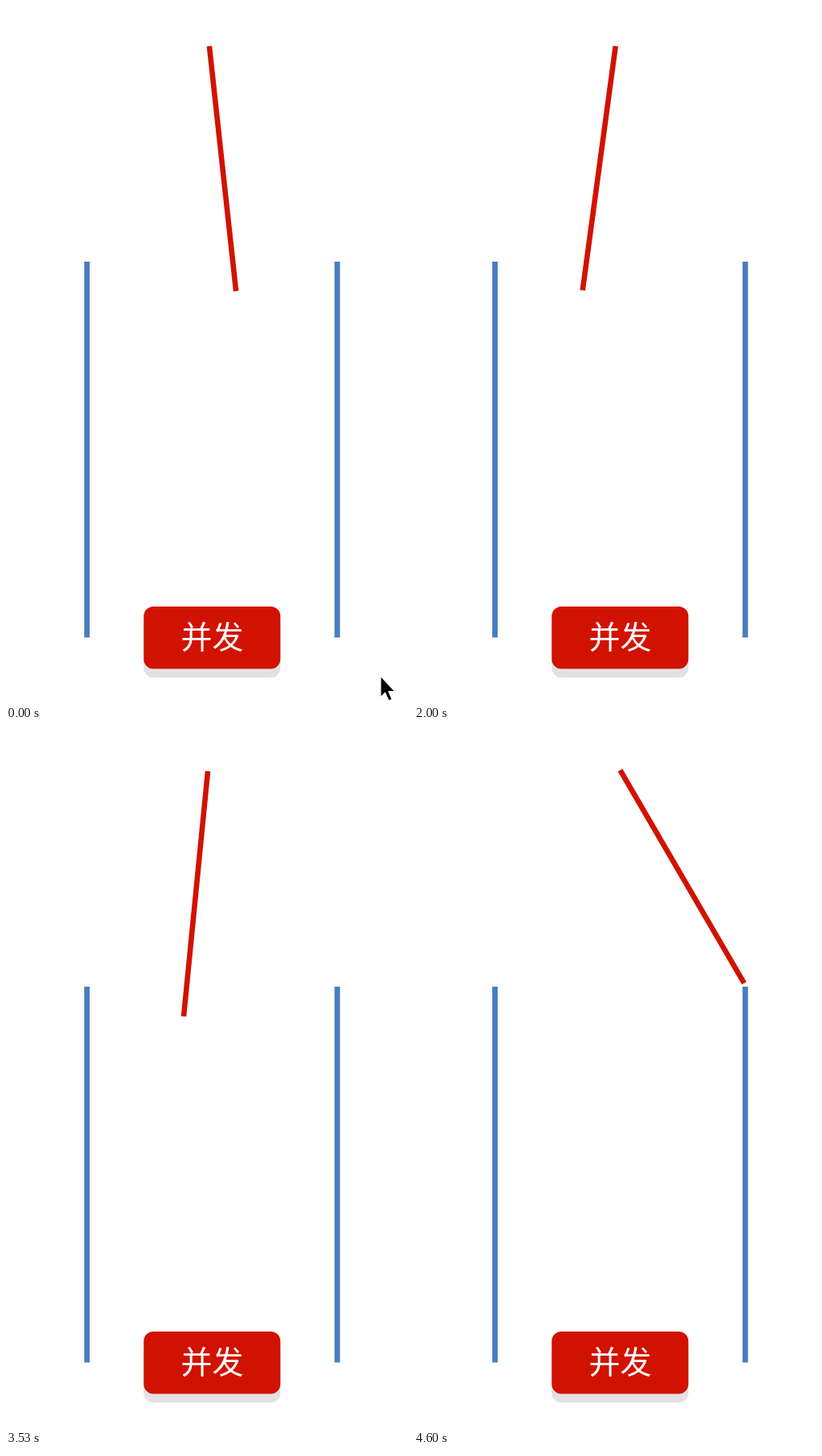
An HTML page that plays this animation: 500x867 px, repeating every 7.4 s.

```html
<!DOCTYPE html>
<html lang="zh">
<head>
<meta charset="utf-8">
<title>Pendulum</title>
<style>
  html, body { margin: 0; width: 100%; height: 100%; overflow: hidden; background: #fff; }
  svg { display: block; width: 500px; height: 867px; }
  text { font: 400 39px "Noto Sans CJK SC", "Noto Sans CJK", sans-serif; fill: #fff; text-anchor: middle; }
  .cursor { stroke: #fff; stroke-width: 1; stroke-linejoin: round; }
</style>
</head>
<body>
<svg viewBox="0 0 500 867">
  <g fill="#477dbe">
    <rect x="97.3" y="318" width="6.8" height="467.5"/>
    <rect x="408.6" y="318" width="6.8" height="467.5"/>
  </g>
  <rect id="rod" x="-3.3" y="9" width="6.6" height="306.5" fill="#d11200"/>
  <rect x="171.3" y="758" width="170" height="77.5" rx="12" fill="#e2e2e2"/>
  <rect x="171.3" y="747" width="170" height="77.5" rx="12" fill="#d11200"/>
  <text x="256.5" y="798.5">并发</text>
  <path id="arrow" class="cursor" d="M0 0V25.5L5.6 20L10 30L14 28.4L9.8 18.6H17.5Z"/>
  <path id="hand" class="cursor" d="M-2.5 2.5Q0 -1 2.5 2.5V11Q6 9 7.5 12Q11 10.5 12.5 13.5Q17 12.5 18 17V24Q17 28 14.5 30V34.5H-1.5V31L-8.5 20Q-8 15.5 -3.5 19L-2.5 20Z"/>
</svg>
<script>
  const LOOP = 7400;
  const PIVOT = [251.9, 41];
  const $ = id => document.getElementById(id);

  // [step, swing phase in degrees]: 0 is far right, 180 is far left
  const SWING = [
    [23, 79.7], [24, 95.3], [30, 252.7], [35, 360],
    [45, 360], [46, 391.1], [53, 616.9], [60, 823.1], [69, 1080]
  ];
  // [first step, last step, from, to]
  const MOVES = [
    [0, 5, [466, 834], [367, 721]],
    [6, 12, [367, 721], [228, 777]]
  ];
  const HIDE_STEP = 16;

  const mix = (a, b, p) => a + (b - a) * p;
  const stepStart = k => Math.round(k * 20 / 3) * 10;

  function stepAt(t) {
    let k = Math.ceil(t * 0.015);
    while (k > 0 && stepStart(k) > t) k--;
    return k;
  }

  function swingAngle(k) {
    let phase = SWING[0][1];
    for (let i = 1; i < SWING.length; i++) {
      const [k0, a] = SWING[i - 1], [k1, b] = SWING[i];
      if (k >= k0) phase = mix(a, b, Math.min(1, (k - k0) / (k1 - k0)));
    }
    return 1 + 29.2 * Math.cos(phase * Math.PI / 180);
  }

  function cursorAt(k) {
    const [k0, k1, from, to] = k < 6 ? MOVES[0] : MOVES[1];
    const p = Math.min(1, (k - k0) / (k1 - k0));
    const e = p * p * (3 - 2 * p);
    return from.map((v, i) => mix(v, to[i], e));
  }

  function place(el, [x, y], rest = "") {
    el.setAttribute("transform", `translate(${x} ${y}) ${rest}`);
  }

  function draw(t) {
    const k = stepAt(t);
    place($("rod"), PIVOT, `rotate(${-swingAngle(k)})`);

    const pos = cursorAt(k);
    const over = pos[0] < 341 && pos[1] > 747;
    const shown = k < HIDE_STEP;
    place($("arrow"), pos);
    place($("hand"), pos);
    $("arrow").style.display = shown && !over ? "" : "none";
    $("hand").style.display = shown && over ? "" : "none";
  }

  const start = performance.now();
  function tick() {
    draw((performance.now() - start) % LOOP);
    requestAnimationFrame(tick);
  }
  tick();
</script>
</body>
</html>
```
